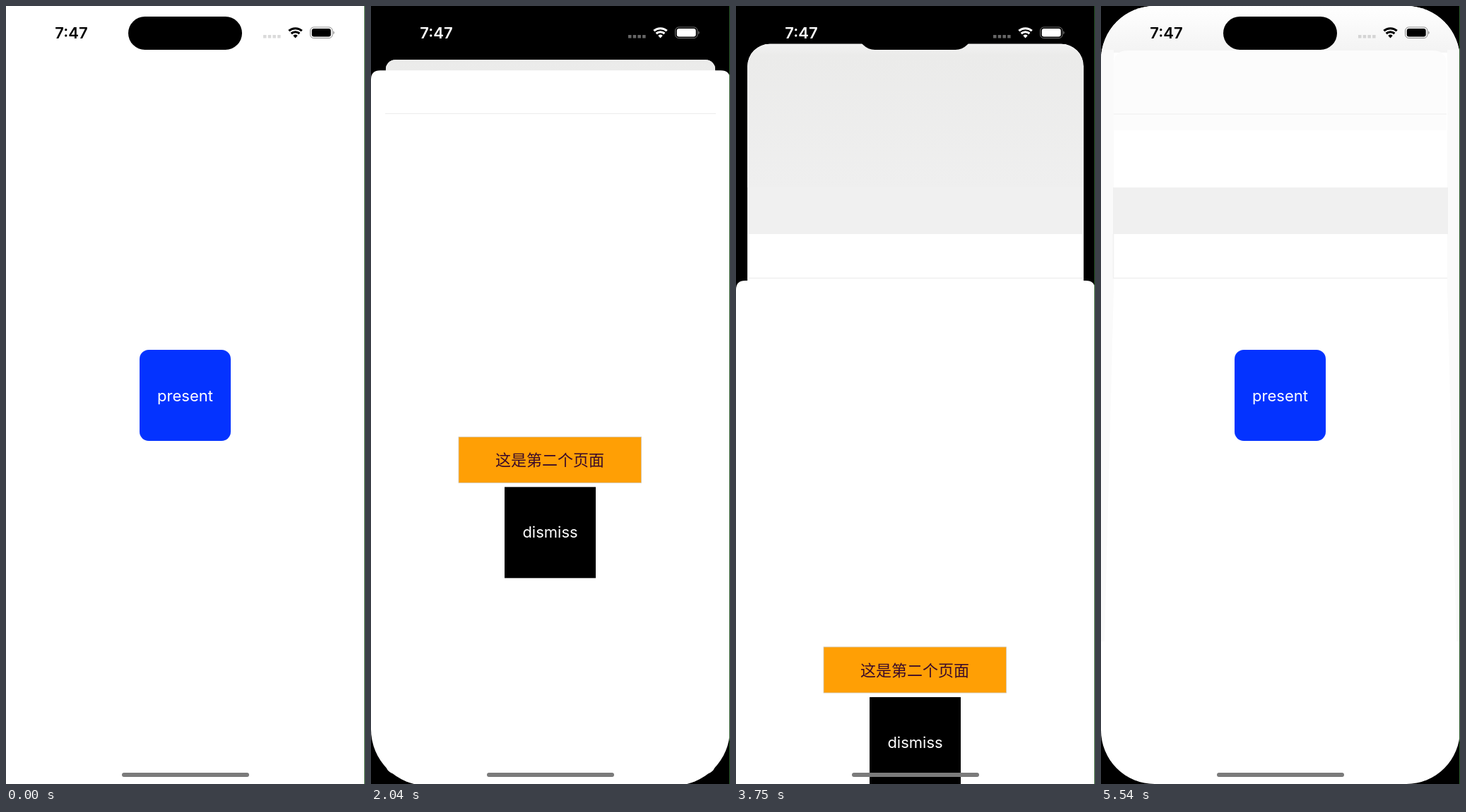
An HTML page for the animation above (5.58 s loop, 508 px wide and 1102 px high).

```html
<!DOCTYPE html>
<html lang="zh">
<head>
<meta charset="utf-8">
<title>Sheet present and dismiss</title>
<style>
html, body { margin: 0; height: 100%; overflow: hidden; background: #000; }
svg { display: block; width: 508px; height: 1102px; }
text { font: 22px Inter, "Open Sans", sans-serif; text-anchor: middle; }
.cjk { font-family: "Noto Sans CJK SC", "Noto Sans CJK", sans-serif; }
</style>
</head>
<body>
<svg viewBox="0 0 508 1102">
  <defs>
    <linearGradient id="dimFill" gradientUnits="userSpaceOnUse" x1="0" y1="36" x2="0" y2="257">
      <stop offset="0" stop-color="#fafafa"/>
      <stop offset=".15" stop-color="#ebebea"/>
      <stop offset="1" stop-color="#efefef"/>
    </linearGradient>
    <linearGradient id="topFill" x1="0" y1="0" x2="0" y2="1">
      <stop offset="0" stop-color="#fff"/>
      <stop offset="1" stop-color="#f3f3f3"/>
    </linearGradient>
    <clipPath id="cardClip"><use href="#card"/></clipPath>
  </defs>

  <rect width="508" height="1102"/>
  <rect id="card" fill="#fff"/>
  <g clip-path="url(#cardClip)">
    <g id="residue">
      <rect width="508" height="66" fill="url(#topFill)"/>
      <path d="M0 62H18V400L5 900H0ZM508 62H490V400L503 900H508Z" fill="#fafafa"/>
      <path d="M18 176V83Q18 63 38 63H469Q489 63 489 83V176Z" fill="#fcfcfc"/>
      <path d="M18 153H489" stroke="#ededed"/>
    </g>
    <rect id="dim" x="16" width="475" height="257" fill="url(#dimFill)"/>
    <rect id="band" x="17" y="257" width="474" height="66" fill="#f0f0f0"/>
    <path id="rule" d="M17.5 323V385.5H490" fill="none" stroke="#f0f0f0" stroke-width="1.5"/>
  </g>
  <g id="button">
    <rect x="189" y="487" width="129" height="129" rx="13" fill="#0433ff"/>
    <text x="253.5" y="560" fill="#fff">present</text>
  </g>

  <g id="sheet">
    <path d="M0 13Q0 0 13 0H495Q508 0 508 13V933A80 80 0 0 1 428 1013H80A80 80 0 0 1 0 933Z" fill="#fff"/>
    <rect x="124" y="519" width="258.5" height="65" fill="#ff9f05" stroke="#d0c8b8" stroke-width=".8"/>
    <text class="cjk" x="253" y="560" fill="#3a0a2a">这是第二个页面</text>
    <rect x="189" y="590" width="129" height="129"/>
    <text x="253.5" y="662" fill="#fff">dismiss</text>
  </g>
  <path id="hair" d="M20 152.5H488" stroke="#ebebeb"/>

  <path d="M507.5 0V1102" stroke="#2c5c2c"/>
  <rect x="173" y="15" width="161" height="47" rx="23.5"/>
  <g id="status" fill="currentColor" stroke="none">
    <text x="92.5" y="46" style="font-weight:600">7:47</text>
    <path id="dots" d="M364 41h4.5v4.5h-4.5zm6.7 0h4.5v4.5h-4.5zm6.7 0h4.5v4.5h-4.5zm6.7 0h4.5v4.5h-4.5z"/>
    <g transform="translate(409.5 45.5)">
      <path d="M-9.2-10.3A13.8 13.8 0 0 1 9.2-10.3M-5.9-6.5A8.8 8.8 0 0 1 5.9-6.5" fill="none" stroke="currentColor" stroke-width="3.1"/>
      <path d="M0 0L-3.2-3.6A4.8 4.8 0 0 1 3.2-3.6Z"/>
    </g>
    <rect x="430.5" y="30" width="31.5" height="15.5" rx="5" fill="none" stroke="currentColor" stroke-opacity=".45"/>
    <rect x="432.7" y="32" width="27" height="11.5" rx="3.2"/>
    <path d="M463.3 35.2Q466 37.7 463.3 40.3Z" opacity=".5"/>
  </g>
  <rect x="164" y="1086" width="180" height="6" rx="3" fill="#7b7b7b"/>
</svg>
<script>
const LOOP = 5580, OPEN = 1630, DRAG = 3290;
const BOTTOM = 1102, REST = 89;
// [time, sheet top] while the finger pulls the sheet down
const pull = [[3290, 143], [3379, 143], [3380, 172], [3750, 388], [3830, 462], [3880, 480],
  [4130, 628], [4209, 628], [4210, 672], [4380, 768], [4460, 800], [5000, 990], [5080, 1010], [5540, 1102]];

const el = id => document.getElementById(id);
const set = (id, attrs) => {
  for (const k in attrs) el(id).setAttribute(k, attrs[k]);
};
const ramp = (t, a, b) => Math.min(1, Math.max(0, (t - a) / (b - a)));
const mix = (a, b, k) => a + (b - a) * k;

function sheetTop(t) {
  if (t < OPEN) return BOTTOM;
  if (t < DRAG) { // critically damped spring
    const u = 18.26 * (t - 1586) / 1000;
    return mix(REST, BOTTOM, (1 + u) * Math.exp(-u));
  }
  const i = pull.findIndex(k => k[0] > t);
  if (i < 0) return BOTTOM;
  const [a, b] = [pull[i - 1], pull[i]];
  return mix(a[1], b[1], ramp(t, a[0], b[0]));
}

function draw(t) {
  const y = sheetTop(t);
  const p = (BOTTOM - y) / (BOTTOM - REST);
  const inset = 21 * Math.pow(p, t < DRAG ? 1 : 0.75);
  const top = 76.5 * p;
  const scale = 1 - inset / 254;

  set('card', {
    x: inset, y: top, width: 508 * scale, height: 1102 * scale,
    rx: t < OPEN ? 0 : mix(76, 13, p)
  });
  set('button', { transform: `translate(${inset} ${top}) scale(${scale})` });
  set('sheet', { transform: `translate(0 ${y})` });

  const clear = ramp(t, 4460, 5400);
  set('dim', { opacity: ramp(t, 1780, 2000) * (1 - clear) });
  set('residue', { opacity: clear });
  set('band', { opacity: +(t >= DRAG) });
  set('rule', { opacity: +(t >= DRAG) });
  set('hair', { opacity: +(t >= 2000 && t < 3380) });

  const light = ramp(t, 1690, 1790) - ramp(t, 5080, 5250);
  const c = Math.round(255 * light);
  el('status').style.color = `rgb(${c},${c},${c})`;
  set('dots', { opacity: light > 0 ? Math.max(0, light - 0.6) : 0.14 });
}

const start = performance.now();
function tick() {
  draw((performance.now() - start) % LOOP);
  requestAnimationFrame(tick);
}
tick();
</script>
</body>
</html>
```
